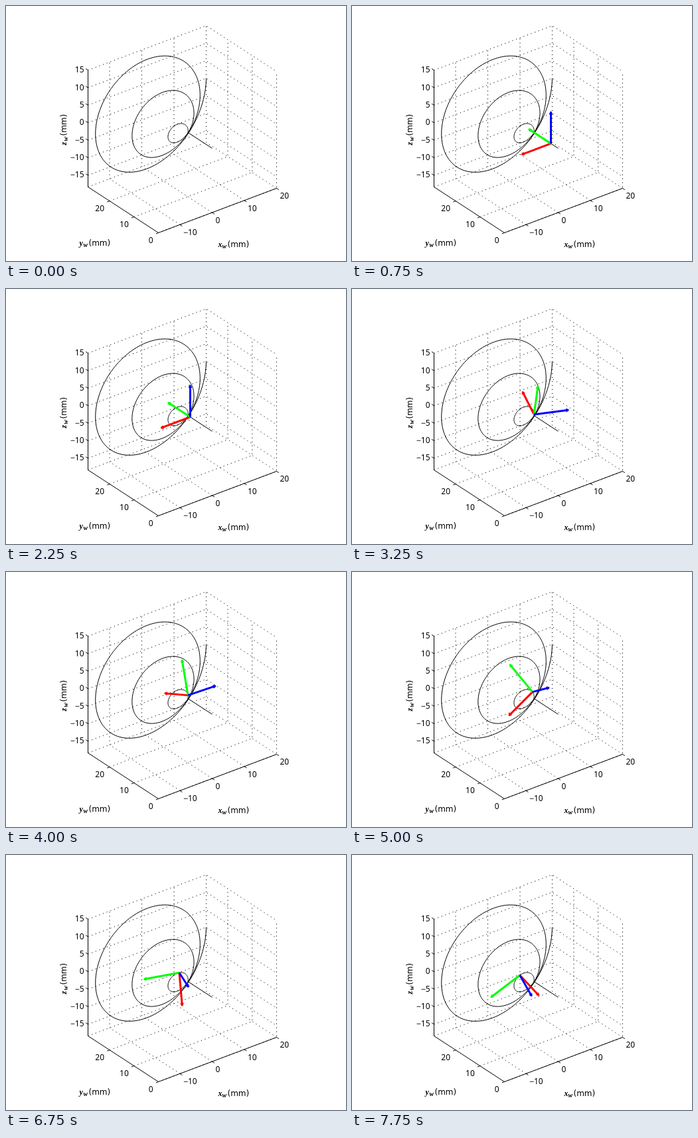
Write an HTML page with a canvas that moves like this. It is 512 px wide and 384 px high and loops after 8 s.

```html
<!DOCTYPE html>
<html lang="en">
<head>
<meta charset="utf-8">
<style>
  html, body { margin: 0; width: 100%; height: 100%; overflow: hidden; background: #fff; }
  canvas { display: block; }
</style>
</head>
<body>
<canvas id="stage" width="512" height="384"></canvas>
<script>
const ctx = document.getElementById('stage').getContext('2d');
const STEP_MS = 250, STEPS = 32;
const STRAIGHT = 10, END = 6 * Math.PI, GROWTH = 20 / END;
const X = [-16.7, 20], Y = [0, STRAIGHT + END], Z = [-18.33, 15];
const ARROW = 9;

const project = ([x, y, z]) => [
  310 + 4.85 * x - 3.674 * y,
  213.8 - 1.826 * x - 2.392 * y - 5.276 * z
];
const cross = (a, b) => [
  a[1] * b[2] - a[2] * b[1],
  a[2] * b[0] - a[0] * b[2],
  a[0] * b[1] - a[1] * b[0]
];
const unit = v => v.map(c => c / Math.hypot(...v));

function strokeScreen(points, color = '#000', width = 1) {
  ctx.strokeStyle = color;
  ctx.lineWidth = width;
  ctx.beginPath();
  points.forEach(p => ctx.lineTo(...p));
  ctx.stroke();
}
const strokeWorld = (...points) => strokeScreen(points.map(project));

function text(str, x, y, align = 'left', font = '12px "Noto Sans", sans-serif') {
  ctx.font = font;
  ctx.textAlign = align;
  ctx.fillText(str, x, y);
}

function axisTick(point, [dx, dy], value, lx, ly, align) {
  const [x, y] = project(point);
  strokeScreen([[x, y], [x + dx, y + dy]]);
  text(String(value).replace('-', '−'), x + lx, y + ly, align);
}

function axisTitle(letter, x, y, angle = 0) {
  ctx.save();
  ctx.translate(x, y);
  ctx.rotate(angle);
  text(letter, 0, 0, 'left', 'italic bold 12px "Liberation Serif", serif');
  text('w', 6, 2, 'left', 'italic bold 10px "Liberation Serif", serif');
  text('(mm)', 14, 0, 'left', '12px "DejaVu Sans", sans-serif');
  ctx.restore();
}

function drawAxes() {
  ctx.fillStyle = '#000';
  ctx.setLineDash([1.2, 4.8]);
  for (const x of [-10, 0, 10, 20]) strokeWorld([x, Y[0], Z[0]], [x, Y[1], Z[0]], [x, Y[1], Z[1]]);
  for (const y of [0, 10, 20]) strokeWorld([X[0], y, Z[0]], [X[1], y, Z[0]], [X[1], y, Z[1]]);
  for (let z = -15; z <= 15; z += 5) strokeWorld([X[0], Y[1], z], [X[1], Y[1], z], [X[1], Y[0], z]);
  strokeWorld([X[0], Y[1], Z[0]], [X[1], Y[1], Z[0]]);
  ctx.setLineDash([]);

  strokeWorld([X[0], Y[1], Z[1]], [X[0], Y[1], Z[0]], [X[0], Y[0], Z[0]], [X[1], Y[0], Z[0]]);
  for (const x of [-10, 0, 10, 20]) axisTick([x, Y[0], Z[0]], [3.4, 2.2], x, 5, 16, 'left');
  for (const y of [0, 10, 20]) axisTick([X[0], y, Z[0]], [-3.7, 1.4], y, -8, 15, 'right');
  for (let z = -15; z <= 15; z += 5) axisTick([X[0], Y[1], z], [-3.4, -2.2], z, -6, 3.5, 'right');
  axisTitle('y', 110, 360);
  axisTitle('x', 319, 362);
  axisTitle('z', 90, 209, -Math.PI / 2);
}

const spiral = t => [GROWTH * t * Math.cos(t), STRAIGHT + t, GROWTH * t * Math.sin(t)];

function drawPath() {
  const points = [[0, 0, 0]];
  for (let i = 0; i <= 400; i++) points.push(spiral(END * i / 400));
  strokeWorld(...points);
}

// Position, normal, tangent and binormal of the moving frame.
function poseAt(step) {
  if (step <= STRAIGHT) return [[0, step, 0], [-1, 0, 0], [0, 1, 0], [0, 0, 1]];
  const t = 0.13 * (step - STRAIGHT - 1), c = Math.cos(t), s = Math.sin(t);
  const tangent = unit([GROWTH * (c - t * s), 1, GROWTH * (s + t * c)]);
  const bend = [-GROWTH * (2 * s + t * c), 0, GROWTH * (2 * c - t * s)];
  const binormal = t === 0 ? [0, 0, 1] : unit(cross(tangent, bend));
  return [spiral(t), cross(binormal, tangent), tangent, binormal];
}

function drawArrow(origin, direction, color) {
  const from = project(origin);
  const to = project(origin.map((c, i) => c + ARROW * direction[i]));
  strokeScreen([from, to], color, 3);
  const angle = Math.atan2(to[1] - from[1], to[0] - from[0]);
  const barb = turn => [to[0] - 4 * Math.cos(angle + turn), to[1] - 4 * Math.sin(angle + turn)];
  strokeScreen([barb(0.5), to, barb(-0.5)], color, 2);
}

function draw(now) {
  const step = Math.floor(now / STEP_MS) % STEPS;
  ctx.setTransform(1, 0, 0, 1, 0, 0);
  ctx.fillStyle = '#fff';
  ctx.fillRect(0, 0, 512, 384);
  ctx.translate(0.5, 0.5);
  ctx.lineJoin = 'round';
  drawAxes();
  drawPath();
  if (step > 0) {
    const [origin, ...axes] = poseAt(step);
    ['#f00', '#0f0', '#00f'].forEach((color, i) => drawArrow(origin, axes[i], color));
  }
}

const start = performance.now();
function loop() {
  draw(performance.now() - start);
  requestAnimationFrame(loop);
}
loop();
</script>
</body>
</html>
```
